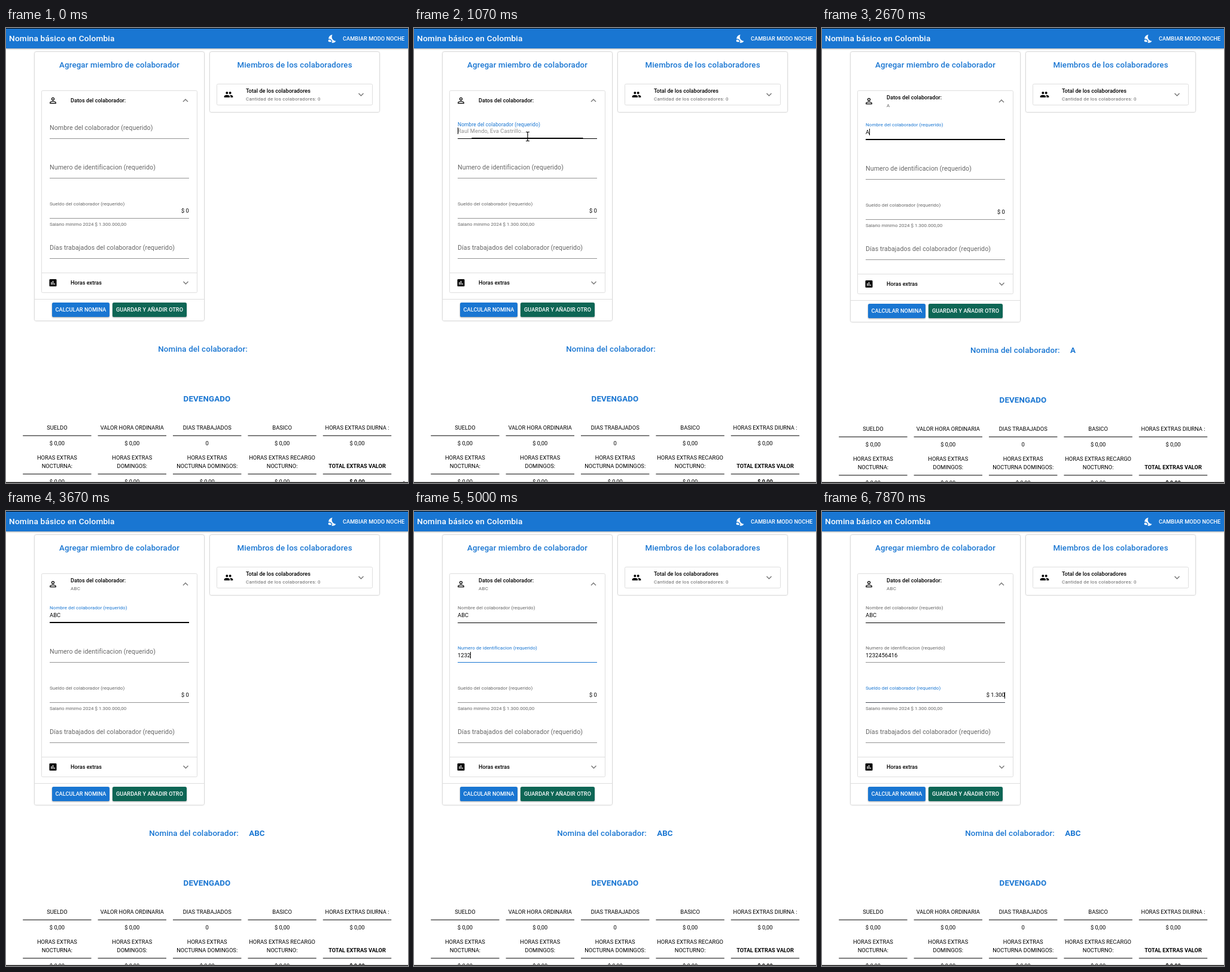
An HTML page for the animation above (8 s loop, 672 px wide and 759 px high).

```html
<!DOCTYPE html>
<html lang="es">
<head>
<meta charset="utf-8">
<title>Nomina</title>
<style>
  html, body { margin: 0; width: 100%; height: 100%; overflow: hidden; background: #fff; }
  svg { display: block; width: 672px; height: 759px; font-family: Roboto, sans-serif; }
  .card { fill: #fff; filter: drop-shadow(0 .8px 1px rgba(0,0,0,.42)); }
  .raised { filter: drop-shadow(0 1px 1px rgba(0,0,0,.35)); }
  .panel { fill: none; stroke: #dedede; }
  .chevron { fill: none; stroke: #757575; stroke-width: 1.4; }
</style>
</head>
<body>
<svg id="stage" viewBox="0 0 672 759"></svg>
<script>
const LOOP = 8000, BLUE = '#1976d2', GREY = '#666', IDLE = '#949494';
const LEFT = 73, RIGHT = 306, RIPPLE = 300;
const stage = document.getElementById('stage');

const ICONS = {
  night: 'M11.1 12.08c-2.33-4.51-.5-8.48.53-10.07C6.27 2.2 1.98 6.59 1.98 12c0 .14.02.28.02.42.62-.27 1.29-.42 2-.42 1.66 0 3.18.83 4.1 2.15 1.67.48 2.9 2.02 2.9 3.85 0 1.52-.87 2.83-2.12 3.51.98.32 2.03.5 3.11.5 3.5 0 6.58-1.8 8.37-4.52-2.36.23-6.98-.97-9.26-5.41zM7 16h-.18C6.4 14.84 5.3 14 4 14c-1.66 0-3 1.34-3 3s1.34 3 3 3h3c1.1 0 2-.9 2-2s-.9-2-2-2z',
  person: 'M12 5.9a2.1 2.1 0 1 1 0 4.2 2.1 2.1 0 0 1 0-4.2m0 9c2.97 0 6.1 1.46 6.1 2.1v1.1H5.9V17c0-.64 3.13-2.1 6.1-2.1M12 4a4 4 0 1 0 0 8 4 4 0 0 0 0-8zm0 9c-2.67 0-8 1.34-8 4v3h16v-3c0-2.66-5.33-4-8-4z',
  group: 'M16 11a3 3 0 1 0 0-6 3 3 0 0 0 0 6zM8 11a3 3 0 1 0 0-6 3 3 0 0 0 0 6zm0 2c-2.33 0-7 1.17-7 3.5V19h14v-2.5c0-2.33-4.67-3.5-7-3.5zm8 0c-.29 0-.62.02-.97.05 1.16.84 1.97 1.97 1.97 3.45V19h6v-2.5c0-2.33-4.67-3.5-7-3.5z',
  chart: 'M19 3H5c-1.1 0-2 .9-2 2v14c0 1.1.9 2 2 2h14c1.1 0 2-.9 2-2V5c0-1.1-.9-2-2-2zM9 17H7v-7h2zm4 0h-2V7h2zm4 0h-2v-4h2z'
};

// Drawing helpers; text is placed by the vertical centre of its capitals.
const rect = (x, y, w, h, fill, more = '') =>
  `<rect x="${x}" y="${y}" width="${w}" height="${h}" fill="${fill}" ${more}/>`;
const text = (str, x, y, size, { fill = '#000', weight = 400, anchor = 'start', gap = 0, opacity = 1 } = {}) =>
  `<text x="${x}" y="${y + size * .36}" font-size="${size}" fill="${fill}" font-weight="${weight}" text-anchor="${anchor}" letter-spacing="${gap}" opacity="${opacity}">${str}</text>`;
const icon = (name, x, y, fill = '#000') =>
  `<path d="${ICONS[name]}" fill="${fill}" fill-rule="${name === 'group' ? 'nonzero' : 'evenodd'}" transform="translate(${x - 8} ${y - 8}) scale(.6667)"/>`;
const chevron = (x, y, dir) =>
  `<path class="chevron" d="M${x - 4} ${y - 2 * dir}l4 ${4 * dir}l4 ${-4 * dir}"/>`;
const heading = (str, x, y, weight = 500) =>
  text(str, x, y, 13.3, { fill: BLUE, weight, anchor: 'middle', gap: .14 });
const strong = (str, x, y, fill = '#000') => text(str, x, y, 9.15, { weight: 500, fill });
const note = (str, x, y) => text(str, x, y, 8, { fill: GREY, gap: .25 });
const button = (str, x, w, fill) =>
  rect(x, 458, w, 24, fill, 'rx="2.6" class="raised"') +
  text(str, x + w / 2, 470, 9.2, { fill: '#fff', weight: 500, anchor: 'middle', gap: .05 });

// cubic-bezier(.4, 0, .2, 1)
function ease(u) {
  if (u <= 0) return 0;
  if (u >= 1) return 1;
  let lo = 0, hi = 1, s;
  for (let i = 0; i < 18; i++) {
    s = (lo + hi) / 2;
    const x = 1.2 * s * (1 - s) ** 2 + .6 * s * s * (1 - s) + s ** 3;
    if (x < u) lo = s; else hi = s;
  }
  return s * s * (3 - 2 * s);
}
const mix = (a, b, p) => a + (b - a) * p;

// Timeline
const NAME_KEYS = [2670, 3200, 3400];
const ID_KEYS = [4600, 4730, 4800, 5000, 5400, 5530, 5600, 5800, 5930, 6070];
const PAY_KEYS = [7200, 7470, 7670, 7870];
const PAY_VALUES = ['0', '1', '13', '130', '1.300'];
const CARET_ON = [[930, 1400], [2000, 2470], [2670, 3070], [3200, 3670],
                  [3930, 4470], [4600, 6930], [7200, LOOP]];
const typed = (keys, t) => keys.filter(k => t >= k).length;

const FIELDS = [
  { label: 'Nombre del colaborador (requerido)', hint: 'Raul Mendo, Eva Castrillo...', y: 165.8, line: 184, focus: 915, blur: 3930, color: '#000', thick: 2, advance: 6.05 },
  { label: 'Numero de identificacion (requerido)', hint: '123456789...', y: 232.4, line: 250, focus: 3930, blur: 6390, color: BLUE, thick: 1, advance: 5.35 },
  { label: 'Sueldo del colaborador (requerido)', y: 299.6, line: 317, focus: 6390, blur: Infinity, color: '#474d57', thick: 1, floated: true },
  { label: 'Días trabajados del colaborador (requerido)', y: 366, line: 384, focus: Infinity, blur: Infinity }
];

function field(f, value, t, hovered, caretOn) {
  const p = ease((t - f.focus) / RIPPLE);
  const float = f.floated ? 1 : p;
  const active = t >= f.focus && t < f.blur;
  const size = mix(10.67, 8, float);
  const inputY = f.y + 6;
  let out = text(f.label, LEFT, f.y - 6.6 * float, size, { fill: active ? BLUE : GREY, gap: size * .0078 });

  if (f.floated) out += text('$ ' + value, RIGHT - .3, 304.6, 9.33, { anchor: 'end' });
  else if (value) out += text(value, LEFT, inputY, 9.33, { gap: .1 });
  else if (f.hint) out += text(f.hint, LEFT, inputY, 9.33, { fill: '#757575', gap: .05, opacity: p });

  out += rect(LEFT, f.line, RIGHT - LEFT, 1, hovered ? '#000' : IDLE);
  const half = (RIGHT - LEFT) / 2 * (p - ease((t - f.blur) / RIPPLE));
  if (half > 0) out += rect(189.5 - half, f.line + 1 - f.thick, half * 2, f.thick, f.color);

  if (active && caretOn) {
    const x = f.floated ? RIGHT - 1 : LEFT + Math.round(value.length * f.advance);
    out += rect(x, Math.round(f.line - 18 + (f.line > 184 ? 1 : 0)), 1, 11, '#000');
  }
  return out;
}

function pointerAt(t) {
  const p = ease((t - 40) / 830);
  return { x: mix(665, 190, p), y: mix(756, 181, p) + 3 * ease((t - 1100) / 280) };
}

function pointer({ x, y }, overField) {
  return overField
    ? `<path d="M${x - 3} ${y - 7.5}h2.2l.8 .8l.8 -.8h2.2M${x} ${y - 7}v14M${x - 3} ${y + 7.5}h2.2l.8 -.8l.8 .8h2.2" fill="none" stroke="#000" stroke-width="1.2"/>`
    : `<path d="M${x} ${y}v13.5l3.1 -2.9l2.2 4.7l2.2 -1l-2.1 -4.6h4.3z" fill="#fff" stroke="#000" stroke-width=".9"/>`;
}

const COLUMNS = [
  ['SUELDO', 'HORAS EXTRAS', 'NOCTURNA:'],
  ['VALOR HORA ORDINARIA', 'HORAS EXTRAS', 'DOMINGOS:'],
  ['DIAS TRABAJADOS', 'HORAS EXTRAS', 'NOCTURNA DOMINGOS:'],
  ['BASICO', 'HORAS EXTRAS RECARGO', 'NOCTURNO:'],
  ['HORAS EXTRAS DIURNA :', '', 'TOTAL EXTRAS VALOR']
];

function table() {
  return COLUMNS.map(([head, upper, lower], i) => {
    const x = 85.4 + 125.4 * i, total = i === 4;
    const cell = (str, y, bold) => text(str, x, y, bold ? 9.2 : 9.33, { anchor: 'middle', weight: bold ? 700 : 400 });
    const rule = y => rect(x - 57.2, y, 114.4, 1.5, '#555');
    return cell(head, 666.6) + rule(679.3) + cell(i === 2 ? '0' : '$ 0,00', 692.4) +
      cell(upper, 716.6) + cell(lower, 730.6, total) + rule(743.3) + cell('$ 0,00', 756.2, total);
  }).join('');
}

const TOP_BAR =
  rect(0, 1, 672, 33, BLUE, 'class="raised"') + rect(0, 0, 672, 1, '#000') +
  text('Nomina básico en Colombia', 5, 17.3, 13.7, { fill: '#fff', weight: 500, gap: .17 }) +
  icon('night', 546, 18, '#fff') +
  text('CAMBIAR MODO NOCHE', 563, 17.6, 9.2, { fill: '#fff', weight: 500, gap: .05 });

const MEMBERS =
  '<rect class="card" x="341" y="40" width="283" height="100" rx="2.6"/>' +
  heading('Miembros de los colaboradores', 482.6, 61.6) +
  '<rect class="panel" x="352.5" y="93.5" width="260" height="35" rx="2"/>' +
  icon('group', 372, 111) + strong('Total de los colaboradores', 401, 105) +
  note('Cantidad de los colaboradores: 0', 401, 118.2) + chevron(593.5, 111, 1);

const TABLE = table();

function scene(t) {
  const name = 'ABC'.slice(0, typed(NAME_KEYS, t));
  const values = [name, '1232456416'.slice(0, typed(ID_KEYS, t)), PAY_VALUES[typed(PAY_KEYS, t)], ''];
  const shift = name ? 2 : 0;
  const caretOn = CARET_ON.some(([from, to]) => t >= from && t < to);
  const mouse = pointerAt(t);
  const overName = mouse.x < RIGHT && mouse.y < 192;

  const form = FIELDS.map((f, i) => field(f, values[i], t, i === 0 && overName, caretOn)).join('') +
    text('Salario minimo 2024 $ 1.300.000,00', LEFT, 327.4, 8, { fill: GREY }) +
    rect(59, 408, 261, 1, '#dedede') +
    icon('chart', 78.5, 425) + strong('Horas extras', 108, 425) + chevron(300.5, 425, 1) +
    rect(48, 452, 283, 1, '#dedede') +
    button('CALCULAR NOMINA', 77, 96, BLUE) + button('GUARDAR Y AÑADIR OTRO', 178, 124, '#0e6655');

  const result = heading('Nomina del colaborador:' + '\u00a0'.repeat(4) +
      (name && `<tspan font-weight="700">\u00a0${name}</tspan>`), 336, 535.6) +
    heading('DEVENGADO', 336, 618.6, 700);

  return `<rect class="card" x="48" y="40" width="283" height="${448 + shift}" rx="2.6"/>` +
    heading('Agregar miembro de colaborador', 189.6, 61.6) +
    `<rect class="panel" x="59.5" y="104.5" width="260" height="${337 + shift}" rx="2"/>` +
    icon('person', 78.5, 121 + shift / 2) + chevron(300, 121 + shift / 2, -1) +
    strong('Datos del colaborador:', 108, name ? 116 : 120.8) + (name && note(name, 108, 129.2)) +
    MEMBERS + TOP_BAR +
    `<g transform="translate(0 ${shift})">${form}${result}${TABLE}</g>` +
    (t < NAME_KEYS[0] ? pointer(mouse, overName) : '') +
    rect(0, 757, 672, 1, '#888') + rect(0, 758, 672, 1, '#111');
}

let shown = '';
function tick() {
  const next = scene(performance.now() % LOOP);
  if (next !== shown) stage.innerHTML = shown = next;
  requestAnimationFrame(tick);
}
tick();
</script>
</body>
</html>
```
